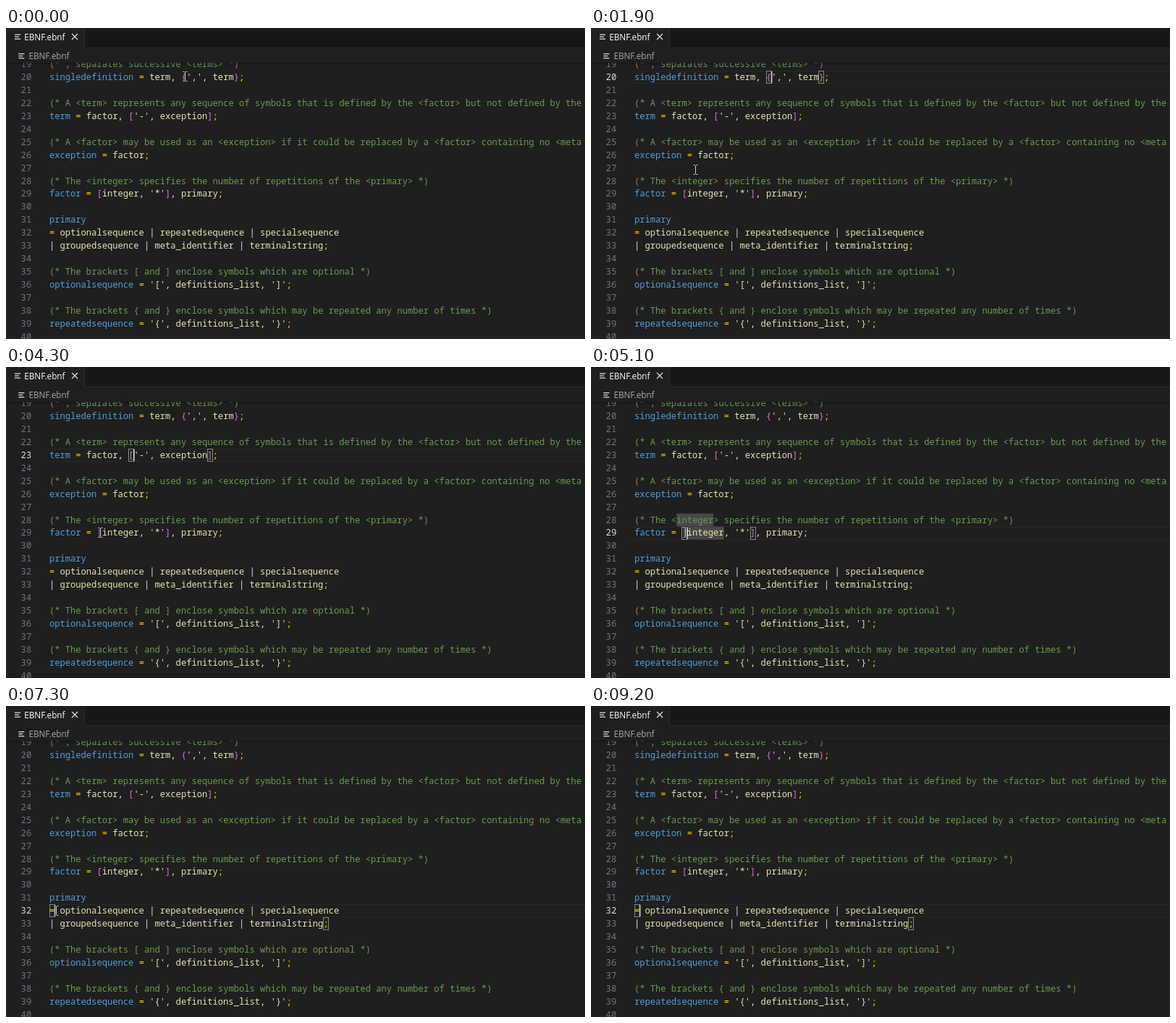
An HTML page with a canvas for the animation above (9300 ms loop, 800 px wide and 430 px high).

```html
<!DOCTYPE html>
<html lang="en">
<head>
<meta charset="utf-8">
<title>EBNF editor</title>
<style>
html, body { margin: 0; width: 100%; height: 100%; overflow: hidden; background: #1f1f1f; }
canvas { display: block; }
</style>
</head>
<body>
<canvas id="stage" width="800" height="430"></canvas>
<script>
const ctx = document.getElementById('stage').getContext('2d');
const LOOP = 9300, STEP = 100;
const LEFT = 59.9, CHAR = 7.28, ROW = 17.95, FIRST = 19;
const CODE_FONT = '500 12.13px "Noto Sans Mono", monospace';
const UI_FONT = '11.7px "Open Sans", sans-serif';

const lines = `(* , separates successive <terms> *)
singledefinition = term, {',', term};

(* A <term> represents any sequence of symbols that is defined by the <factor> but not defined by the
term = factor, ['-', exception];

(* A <factor> may be used as an <exception> if it could be replaced by a <factor> containing no <meta
exception = factor;

(* The <integer> specifies the number of repetitions of the <primary> *)
factor = [integer, '*'], primary;

primary
= optionalsequence | repeatedsequence | specialsequence
| groupedsequence | meta_identifier | terminalstring;

(* The brackets [ and ] enclose symbols which are optional *)
optionalsequence = '[', definitions_list, ']';

(* The brackets { and } enclose symbols which may be repeated any number of times *)
repeatedsequence = '{', definitions_list, '}';
`.split('\n');

// Each click: time, blink phase start, caret [line, column], bracket pair, highlighted words
const clicks = [
  { at: 400, blink: 450, caret: [20, 26], pair: [[20, 25], [20, 35]] },
  { at: 2800, blink: 2850, caret: [23, 16], pair: [[23, 15], [23, 30]] },
  { at: 4700, blink: 4700, caret: [29, 10], pair: [[29, 9], [29, 22]], words: [[28, 8, 7], [29, 10, 7]] },
  { at: 7100, blink: 7100, caret: [32, 1], pair: [[32, 0], [33, 52]] }
];

// Pointer stops: time, x, y
const path = [
  [0, 248, 67], [800, 248, 67], [1900, 145, 196], [2700, 180, 122], [3400, 180, 122],
  [4300, 131, 229], [5300, 131, 229], [6000, 121, 277], [6800, 70, 283],
  [8000, 70, 283], [8800, 150, 38], [LOOP, 150, 38]
];

const colX = col => LEFT + col * CHAR;
const midY = line => 68 + (line - 20) * ROW;

function rect(color, x, y, w, h) {
  ctx.fillStyle = color;
  ctx.fillRect(x, y, w, h);
}

function text(str, x, y, color) {
  ctx.fillStyle = color;
  ctx.fillText(str, x, y);
}

function tokenColor(token, isRule) {
  if (isRule) return '#569cd6';
  if (/^[=;]$/.test(token)) return '#ffd700';
  if (/^[{}[\]]$/.test(token)) return '#da70d6';
  return /^[\w']/.test(token) ? '#e6e3b8' : '#e6e6e0';
}

function drawLine(str, number, active) {
  const y = midY(number) + 3.9;
  text(number, 20.6, y, active ? '#dddddd' : '#6e7681');
  if (str.startsWith('(*')) {
    for (const { 0: word, index } of str.matchAll(/\S+/g)) text(word, colX(index), y, '#6a9955');
    return;
  }
  for (const { 0: token, index } of str.matchAll(/'[^']*'|\w+|\S/g))
    text(token, colX(index), y, tokenColor(token, index === 0 && /\w/.test(token)));
}

function drawSelection({ caret, pair, words = [] }) {
  const top = Math.round(midY(caret[0]) - 9);
  rect('#272727', 56, top, 744, 1);
  rect('#272727', 56, top + 17, 744, 1);
  for (const [line, col, length] of words)
    rect('#484848', colX(col), midY(line) - 9, length * CHAR, ROW);
  for (const [line, col] of pair) {
    const x = Math.round(colX(col) - .4), y = Math.round(midY(line) - 9);
    rect('rgba(0,100,0,.12)', x, y, 8, 18);
    ctx.strokeStyle = '#858585';
    ctx.lineWidth = 1;
    ctx.strokeRect(x + .5, y + .5, 7, 17);
  }
}

function fileIcon(x, y) {
  [8, 6, 8].forEach((w, i) => rect('#c8cccf', x, y + i * 3, w, 1.4));
}

function drawHeader() {
  rect('#1f1f1f', 0, 0, 800, 48);
  rect('#181818', 108, 0, 692, 27);
  rect('#2b2b2b', 108, 0, 1, 27);
  rect('#2b2b2b', 108, 27, 692, 1);
  const shadow = ctx.createLinearGradient(0, 48, 0, 52);
  shadow.addColorStop(0, 'rgba(0,0,0,.25)');
  shadow.addColorStop(1, 'rgba(0,0,0,0)');
  rect(shadow, 0, 48, 800, 4);
  ctx.font = UI_FONT;
  fileIcon(12, 8.5);
  text('EBNF.ebnf', 25.3, 16.7, '#ffffff');
  fileIcon(17.3, 35);
  text('EBNF.ebnf', 31.4, 43.3, '#a9a9a9');
  ctx.strokeStyle = '#e0e0e0';
  ctx.lineWidth = 1.2;
  ctx.beginPath();
  ctx.moveTo(91, 8); ctx.lineTo(99, 16);
  ctx.moveTo(99, 8); ctx.lineTo(91, 16);
  ctx.stroke();
}

function pointerAt(t) {
  const i = path.findIndex(stop => stop[0] > t);
  const [t0, x0, y0] = path[i - 1], [t1, x1, y1] = path[i];
  const k = (1 - Math.cos(Math.PI * (t - t0) / (t1 - t0))) / 2;
  return [x0 + (x1 - x0) * k, y0 + (y1 - y0) * k];
}

function drawPointer(x, y) {
  if (y < 50) return;
  x = Math.round(x) - .5;
  y = Math.round(y);
  ctx.beginPath();
  for (const side of [-1, 1]) {
    const tip = y + side * 6.5, neck = y + side * 5.5;
    ctx.moveTo(x - 3, tip);
    ctx.lineTo(x - 1, tip);
    ctx.lineTo(x, neck);
    ctx.lineTo(x + 1, tip);
    ctx.lineTo(x + 3, tip);
  }
  ctx.moveTo(x, y - 5.5);
  ctx.lineTo(x, y + 5.5);
  for (const [color, width] of [['rgba(20,20,20,.6)', 2.4], ['#d8d8d8', 1]]) {
    ctx.strokeStyle = color;
    ctx.lineWidth = width;
    ctx.stroke();
  }
}

function draw(now) {
  const t = Math.floor(now % LOOP / STEP) * STEP;
  const click = clicks.filter(c => c.at <= t).pop();
  rect('#1f1f1f', 0, 0, 800, 430);
  if (click) drawSelection(click);
  ctx.font = CODE_FONT;
  lines.forEach((str, i) => drawLine(str, FIRST + i, click && click.caret[0] === FIRST + i));
  if (click && (t < click.blink || (t - click.blink) % 1000 < 500)) {
    const [line, col] = click.caret;
    rect('#d8d8d8', colX(col) - .4, Math.round(midY(line) - 8), 1.6, 16);
  }
  drawHeader();
  drawPointer(...pointerAt(t));
  requestAnimationFrame(draw);
}
requestAnimationFrame(draw);
</script>
</body>
</html>
```
